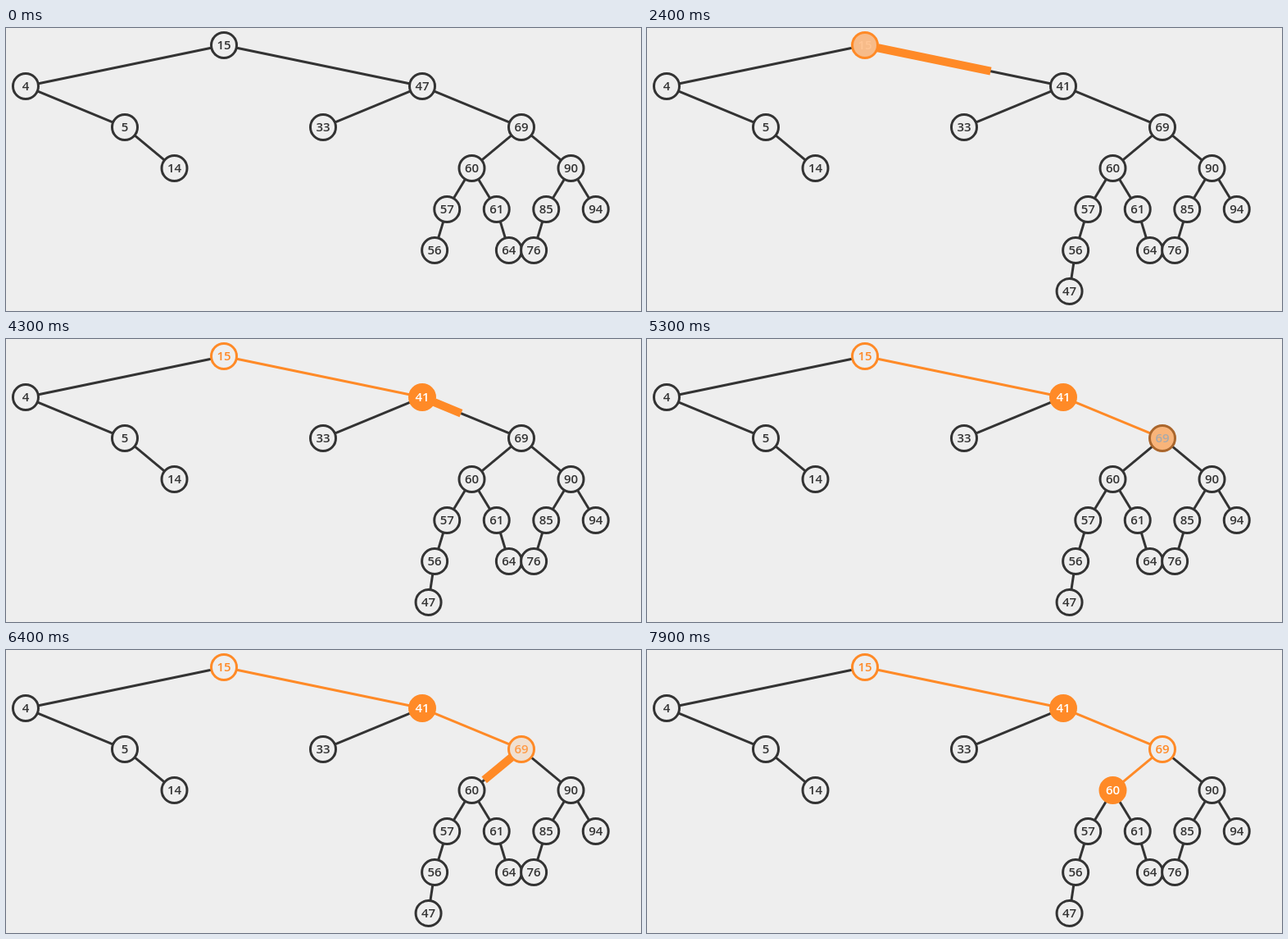
Recreate the animation shown at these times as an HTML page. Size 775 by 345 pixels, loop 8 s.

```html
<!DOCTYPE html>
<html lang="en">
<head>
<meta charset="utf-8">
<title>Binary search tree insertion</title>
<style>
  html, body { margin: 0; width: 100%; height: 100%; overflow: hidden; background: #eee; }
  svg { display: block; width: 775px; height: 345px; }
  text { font: 600 15px "Open Sans", "Noto Sans", sans-serif; text-anchor: middle; }
</style>
</head>
<body>
<svg id="stage" viewBox="0 0 775 345"></svg>
<script>
const LOOP = 8000, INSERT = 600, RADIUS = 16;
const FILL_TIME = 600, WALK_TIME = 830, FADE_LAG = 50;
const PAPER = [238, 238, 238], INK = [51, 51, 51], ORANGE = [255, 138, 39], WHITE = [255, 255, 255];

// Looks of a node: fill, outline, label
const IDLE = [PAPER, INK, INK], ACTIVE = [ORANGE, ORANGE, WHITE], VISITED = [PAPER, ORANGE, ORANGE];

// Each node: label, path from the root, then optional times of activation and fading
const tree = [
  ["15", "", 1122, 1938 + FADE_LAG],
  ["4", "L"], ["5", "LR"], ["14", "LRR"],
  ["41", "R", 3026], ["33", "RL"],
  ["69", "RR", 4983, 5795 + FADE_LAG],
  ["60", "RRL", 6935], ["90", "RRR"],
  ["57", "RRLL"], ["61", "RRLR"], ["85", "RRRL"], ["94", "RRRR"],
  ["56", "RRLLL"], ["64", "RRLRR"], ["76", "RRRLL"],
  ["47", "RRLLLL"]
];
const walkStart = { R: 1938, RR: 3930, RRL: 5795 };

const stage = document.getElementById("stage");

function add(parent, tag, attrs) {
  const el = document.createElementNS("http://www.w3.org/2000/svg", tag);
  return set(parent.appendChild(el), attrs);
}

function set(el, attrs) {
  for (const key in attrs) el.setAttribute(key, attrs[key]);
  return el;
}

function place(path) {
  let x = 266, step = 242;
  for (const side of path) {
    x += side === "L" ? -step : step;
    step /= 2;
  }
  return { x, y: 21 + 50 * path.length };
}

// Cubic in-out progress
function progress(t, start, span) {
  const p = Math.min(1, Math.max(0, (t - start) / span));
  return p < 0.5 ? 4 * p ** 3 : 1 - 4 * (1 - p) ** 3;
}

const mix = (a, b, k) => `rgb(${a.map((v, i) => Math.round(v + (b[i] - v) * k))})`;

const edgeLayer = add(stage, "g", { "stroke-width": 3 });
const walkLayer = add(stage, "g", { "stroke-width": 10, stroke: mix(ORANGE, ORANGE, 0) });
const nodeLayer = add(stage, "g", { "stroke-width": 3 });

const edges = tree.filter(([, path]) => path).map(([, path]) => {
  const a = place(path.slice(0, -1)), b = place(path);
  const len = Math.hypot(b.x - a.x, b.y - a.y);
  const ux = (b.x - a.x) / len, uy = (b.y - a.y) / len;
  const x1 = a.x + ux * RADIUS, y1 = a.y + uy * RADIUS;
  const dx = ux * (len - 2 * RADIUS), dy = uy * (len - 2 * RADIUS);
  const line = add(edgeLayer, "line", { x1, y1, x2: x1 + dx, y2: y1 + dy });
  const start = walkStart[path];
  const walk = start && add(walkLayer, "line", { x1, y1 });
  return { line, walk, start, x1, y1, dx, dy };
});

const nodes = tree.map(([label, path, on = Infinity, off = Infinity]) => {
  const { x, y } = place(path);
  const group = add(nodeLayer, "g", {});
  const disc = add(group, "circle", { cx: x, cy: y, r: 15.5 });
  const text = add(group, "text", { x, y: y + 5.3, "stroke-width": 0 });
  text.textContent = label;
  return { group, disc, text, on, off };
});

const newNode = nodes[nodes.length - 1], newEdge = edges[edges.length - 1];
const swapped = nodes.find(n => n.text.textContent === "41");

function draw(t) {
  const inserted = t >= INSERT;
  const visibility = inserted ? "visible" : "hidden";
  set(newNode.group, { visibility });
  set(newEdge.line, { visibility });
  swapped.text.textContent = inserted ? "41" : "47";

  for (const { line, walk, start, x1, y1, dx, dy } of edges) {
    const done = t >= start + WALK_TIME;
    set(line, { stroke: mix(done ? ORANGE : INK, INK, 0) });
    if (!walk) continue;
    const k = progress(t, start, WALK_TIME);
    set(walk, {
      x2: x1 + dx * k, y2: y1 + dy * k,
      visibility: t > start && !done ? "visible" : "hidden"
    });
  }

  for (const { disc, text, on, off } of nodes) {
    const fading = t >= off;
    const from = fading ? ACTIVE : IDLE, to = fading ? VISITED : ACTIVE;
    const k = fading ? progress(t, off, WALK_TIME) : progress(t, on, FILL_TIME);
    const [fill, stroke, ink] = from.map((c, i) => mix(c, to[i], k));
    set(disc, { fill, stroke });
    set(text, { fill: ink });
  }
}

const begin = performance.now();
function tick() {
  draw((performance.now() - begin) % LOOP);
  requestAnimationFrame(tick);
}
tick();
</script>
</body>
</html>
```
